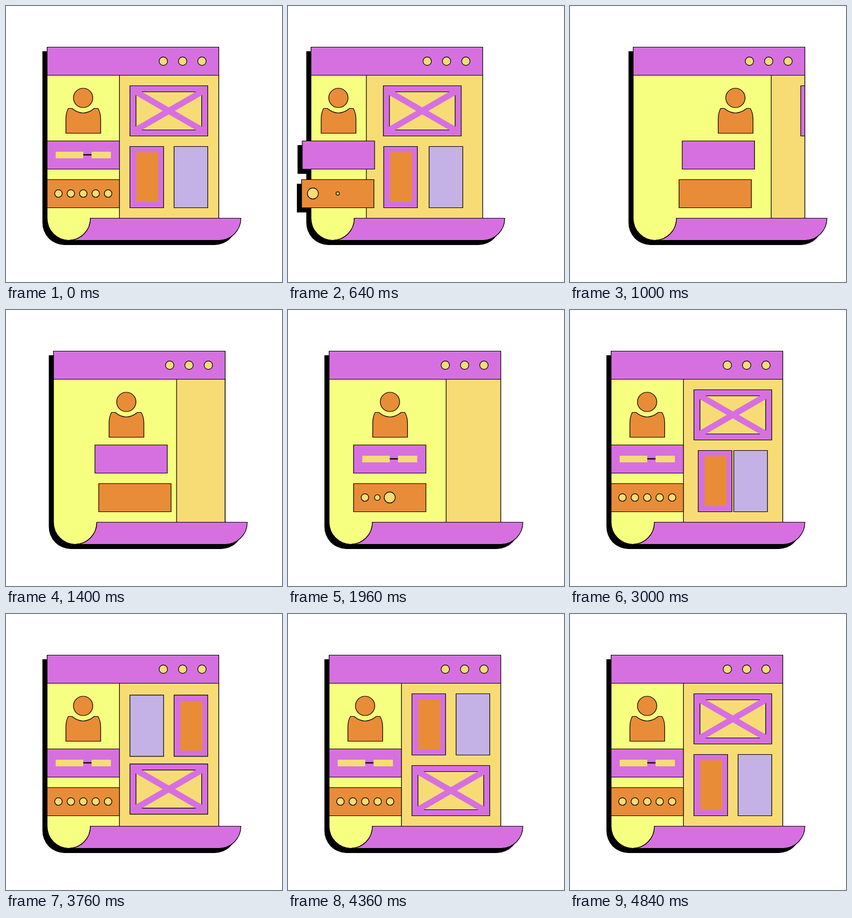
Recreate the animation shown at these times as an HTML page with a canvas. Size 500 px wide and 500 px high, loop 5 s.

```html
<!DOCTYPE html>
<html>
<head>
<meta charset="utf-8">
<style>
html, body { margin: 0; width: 100%; height: 100%; overflow: hidden; background: #fff; }
canvas { display: block; }
</style>
</head>
<body>
<canvas id="stage" width="500" height="500"></canvas>
<script>
const ctx = document.getElementById('stage').getContext('2d');
const LOOP = 5000;
const PURPLE = '#d670e0', YELLOW = '#f6ff80', CREAM = '#f7dc76',
      ORANGE = '#e88c38', LAVENDER = '#c4b2e6', BLACK = '#000';

// Value at time t along [time, value] keys, eased in and out between them.
function track(t, ...keys) {
  if (t <= keys[0][0]) return keys[0][1];
  for (let i = 1; i < keys.length; i++) {
    const [t0, v0] = keys[i - 1], [t1, v1] = keys[i];
    if (t < t1) return v0 + (v1 - v0) * (1 - Math.cos(Math.PI * (t - t0) / (t1 - t0))) / 2;
  }
  return keys[keys.length - 1][1];
}

function shape(d, fill, outlined = true) {
  const path = typeof d === 'string' ? new Path2D(d) : d;
  ctx.fillStyle = fill;
  ctx.fill(path);
  if (outlined) {
    ctx.strokeStyle = BLACK;
    ctx.lineWidth = 1.2;
    ctx.stroke(path);
  }
}

function rect(x, y, w, h, fill, outlined) {
  const path = new Path2D();
  path.rect(x, y, w, h);
  shape(path, fill, outlined);
}

function circle(x, y, r, fill) {
  if (r < 0.3) return;
  const path = new Path2D();
  path.arc(x, y, r, 0, 2 * Math.PI);
  shape(path, fill);
}

function at(x, y, draw) {
  ctx.save();
  ctx.translate(x, y);
  draw();
  ctx.restore();
}

function banner() {
  rect(224.5, 144.5, 141, 91, PURPLE);
  rect(235.5, 155.5, 119, 69, CREAM);
  ctx.strokeStyle = PURPLE;
  ctx.lineWidth = 11;
  ctx.stroke(new Path2D('M232 153.5L358 226.5M358 153.5L232 226.5'));
}

function framedCard() {
  rect(224.5, 254.5, 61, 111, PURPLE);
  rect(236, 265, 40, 90, ORANGE, false);
}

function person() {
  circle(139.7, 166.5, 17.5, ORANGE);
  shape('M108.5 230.5V205Q108.5 193 113 185.5H119.5Q139.5 202 160 185.5H166.5Q171.5 193 171.5 205V230.5Z', ORANGE);
}

function label(shown) {
  ctx.save();
  ctx.beginPath();
  ctx.rect(90, 260, 100 * shown, 20);
  ctx.clip();
  rect(140, 268.5, 15, 2.2, BLACK, false);
  rect(90, 264, 50, 12, CREAM, false);
  rect(155, 264, 35, 12, CREAM, false);
  ctx.restore();
}

// Dots pop in following this order and leave in reverse.
const popOrder = [0, 2, 1, 4, 3];

function dots(t) {
  popOrder.forEach((slot, k) => {
    const out = 560 - 100 * k, back = 1720 + 80 * k;
    const r = track(t, [out, 6.8], [out + 80, 10], [out + 240, 0],
                       [back, 0], [back + 160, 10], [back + 240, 6.8]);
    circle(95 + 22.5 * slot, 339.7, r, CREAM);
  });
}

// Pull left, fling right until `end`, settle into the open layout, then close.
const slide = (t, start, end, pulled, flung, open) =>
  track(t, [160, 0], [start, pulled], [end, flung], [Math.max(end, 1120), flung],
           [Math.max(end, 1120) + 440, open], [2290, open], [2800, 0]);

// Page content: leaves the window to the right and comes back.
const leave = (t, dur) =>
  track(t, [160, 0], [579, -60], [579 + dur, 260], [2290, 260], [2840, 0]);

function draw(t) {
  const win = track(t, [160, 0], [562, -40], [970, 40], [1120, 40], [1560, 0]);
  const divider = slide(t, 570, 990, -80, 159, 81);
  const personX = slide(t, 590, 990, -57, 160, 45);
  const labelX = slide(t, 569, 1143, -57, 160, 44.3);
  const dotsX = slide(t, 573, 1160, -57, 160, 44.3);
  const swap = track(t, [2920, 0], [3320, 80], [3900, 80], [4300, 0]);
  const flip = track(t, [3390, 0], [3800, 1], [4440, 0 + 1], [4840, 0]);

  ctx.fillStyle = '#fff';
  ctx.fillRect(0, 0, 500, 500);

  // Shadows
  at(win - 8, 8, () => shape('M74 74H386V384H426A40 40 0 0 1 386 425H114A40 40 0 0 1 74 384Z', BLACK, false));
  at(labelX - 8, 8, () => rect(74, 244, 132, 52, BLACK, false));
  at(dotsX - 8, 8, () => rect(74, 314, 132, 52, BLACK, false));

  // Page and its content
  ctx.save();
  ctx.beginPath();
  ctx.rect(win + 74.5, 125.5, 311, 259);
  ctx.clip();
  rect(win + 74.5, 125.5, 311, 259, CREAM);
  at(leave(t, 604), 130 * flip, banner);
  at(leave(t, 520) - swap, -110 * flip, () => rect(304.5, 254.5, 61, 111, LAVENDER));
  at(leave(t, 580) + swap, -110 * flip, framedCard);
  ctx.restore();

  // Sidebar, header and rolled edge
  at(win, 0, () => {
    shape(`M74.5 125.5H${205.5 + divider - win}V384.5H153A39 40 0 0 1 114 424.5A39.5 40 0 0 1 74.5 384.5Z`, YELLOW);
    rect(74.5, 74.5, 311, 51, PURPLE);
    [285, 320, 355].forEach(x => circle(x, 100, 7.6, CREAM));
    ctx.strokeStyle = BLACK;
    ctx.lineWidth = 1.2;
    ctx.stroke(new Path2D('M385.5 125V384.5'));
    shape('M153 384.5H425.5A39.5 40 0 0 1 386 424.5H114A39 40 0 0 0 153 384.5Z', PURPLE);
  });

  // Sidebar items
  at(personX, 0, person);
  at(labelX, 0, () => {
    rect(74.5, 244.5, 131, 51, PURPLE);
    label(track(t, [180, 1], [560, 0], [1540, 0], [1900, 1]));
  });
  at(dotsX, 0, () => {
    rect(74.5, 314.5, 131, 51, ORANGE);
    dots(t);
  });
}

const begin = performance.now();
function tick() {
  draw((performance.now() - begin) % LOOP);
  requestAnimationFrame(tick);
}
tick();
</script>
</body>
</html>
```
